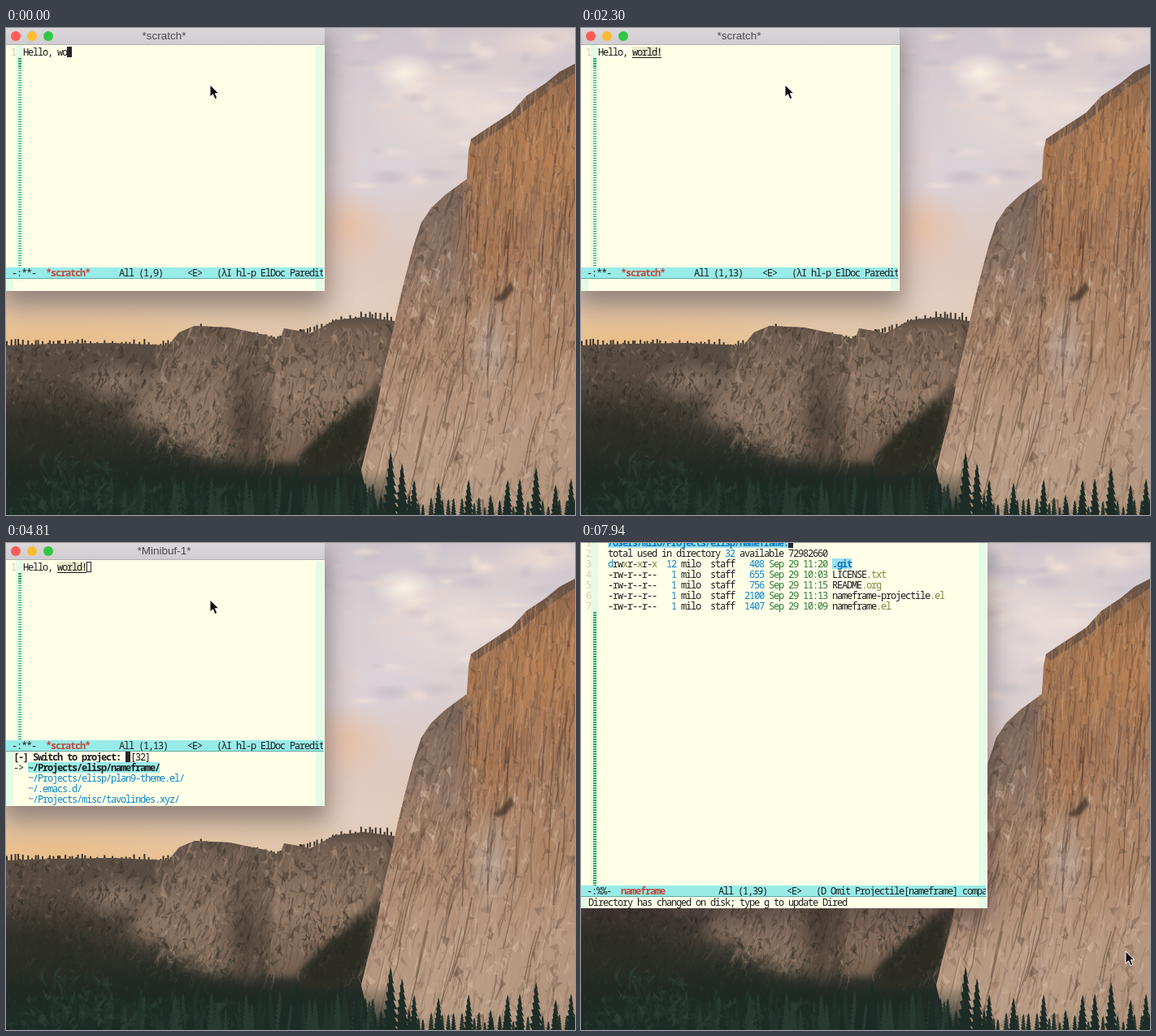
An HTML page with a canvas for the animation above (8 s loop, 700 by 600 pixels).

```html
<!DOCTYPE html>
<html lang="en">
<head>
<meta charset="utf-8">
<title>Switching projects</title>
<style>
html, body { margin: 0; width: 100%; height: 100%; overflow: hidden; }
#stage { position: relative; width: 700px; height: 600px; overflow: hidden; }
#stage * { position: absolute; box-sizing: border-box; }
canvas { left: 0; top: 0; }
.win { left: 0; overflow: hidden; background: #ffffe8; }
.shade { left: 0; top: 0; box-shadow: 0 14px 28px 4px rgba(40, 30, 35, .42); }
.bar { left: 0; top: 0; width: 100%; height: 21px; background: linear-gradient(#dbd7da, #d0ccd0); border-bottom: 1px solid #b5b0b3; }
.bar i { top: 4px; width: 12px; height: 12px; border-radius: 50%; }
.bar span { left: 0; width: 389px; top: 0; text-align: center; color: #4a474a; font: 13.5px/20px "Liberation Sans", Arial, sans-serif; }
.row, .mode { white-space: pre; color: #1c1c1c; font: 500 12px/13px "Noto Sans Mono", "DejaVu Sans Mono", monospace; font-stretch: 62.5%; letter-spacing: calc(6px - 1ch); height: 13px; }
#stage .row *, #stage .mode * { position: static; }
.mode { left: 0; padding-left: 1px; width: 100%; overflow: hidden; background: #98ece8; border-right: 2px solid #ffffe8; height: 14px; border-bottom: 1px solid #5fa9a5; }
.mode b { color: #c4473c; }
.num { color: #cdcdb6; font-weight: 400; }
.u { color: #0a86c8; } .g { color: #2c7a35; } .o { color: #82823a; }
.dir, .pick, .mark { display: inline-block; height: 13px; vertical-align: top; }
.dir { color: #0a78bc; font-weight: 700; background: #9ce0f2; }
.pick { background: #98ece8; font-weight: 700; }
.mark { background: #e8e8cc; text-decoration: underline; text-underline-offset: 2px; }
.cur { width: 6px; height: 13px; background: #262626; }
.hollow { background: none; border: 1px solid #262626; }
.fringe { width: 9px; background: #e4fbe5; }
.dash { left: 15px; width: 4px; background: repeating-linear-gradient(#33a563 0 1.5px, transparent 1.5px 3px); }
.hide { display: none; }
</style>
</head>
<body>
<div id="stage">
  <canvas id="photo" width="700" height="600"></canvas>

  <div id="edit">
    <div class="shade" style="width:392px;height:324px"></div>
    <div class="win" style="top:0;width:392px;height:324px">
      <div class="bar">
        <i style="left:6px;background:#fc5b53"></i><i style="left:26px;background:#fdbc2f"></i><i style="left:46px;background:#32c546"></i>
        <span id="title"></span>
      </div>
      <div class="fringe" style="left:12px;top:21px;height:290px"></div>
      <div class="fringe" style="left:0;top:244px;height:80px" id="low"></div>
      <div class="fringe" style="left:381px;top:23px;height:301px"></div>
      <div class="row num" style="left:6px;top:23px">1</div>
      <div class="row" style="left:21px;top:23px">Hello, <span id="word"></span></div>
      <div class="cur" id="point" style="top:23px"></div>
      <div class="dash" id="dash" style="top:37px"></div>
      <div id="mini" style="left:9px;top:257px;width:372px;height:67px;background:#ffffe8"></div>
      <div class="mode" id="mode"></div>
    </div>
  </div>

  <div id="dired">
    <div class="shade" style="width:500px;height:450px"></div>
    <div class="win" id="list" style="top:0;width:500px;height:450px">
      <div class="fringe" style="left:12px;top:0;height:422px"></div>
      <div class="fringe" style="left:489px;top:0;height:450px"></div>
      <div class="fringe" style="left:0;top:435px;height:15px"></div>
      <div class="dash" style="top:85px;height:337px"></div>
      <div class="mode" style="top:422px"> -:%%-  <b>nameframe</b>           All (1,39)    &lt;E&gt;   (D Omit Projectile[nameframe] company</div>
      <div class="row" style="left:9px;top:436px">Directory has changed on disk; type g to update Dired</div>
    </div>
  </div>

  <svg id="beam" width="12" height="20" style="left:246px;top:63px" fill="none" stroke="#222"><path d="M2 1.5Q5.5 1.5 5.5 4V15Q5.5 17.5 2 17.5M9 1.5Q5.5 1.5 5.5 4M9 17.5Q5.5 17.5 5.5 15M3.5 11.5H7.5"/></svg>
  <svg id="arrow" width="15" height="22" style="left:0;top:0"><path d="M1 1V16L4.5 12.8L7 18.6L9.9 17.4L7.4 11.7H12Z" fill="#111" stroke="#fff"/></svg>
</div>

<script>
const $ = id => document.getElementById(id);

// ---------- desktop picture ----------
const ctx = $('photo').getContext('2d');
let seed = 7;
const rnd = (a = 0, b = 1) => {
  seed = (seed * 16807) % 2147483647;
  return a + (b - a) * seed / 2147483647;
};
const pick = list => list[Math.floor(rnd(0, list.length))];

function shape(pts) {
  const p = new Path2D();
  for (let i = 0; i < pts.length; i += 2) p.lineTo(pts[i], pts[i + 1]);
  p.closePath();
  return p;
}

function fade(x0, y0, x1, y1, ...colors) {
  const g = ctx.createLinearGradient(x0, y0, x1, y1);
  colors.forEach((c, i) => g.addColorStop(i / (colors.length - 1), c));
  return g;
}

function glow(x, y, rx, ry, rgb, alpha) {
  ctx.save();
  ctx.translate(x, y);
  ctx.scale(rx, ry);
  const g = ctx.createRadialGradient(0, 0, 0, 0, 0, 1);
  g.addColorStop(0, `rgba(${rgb},${alpha})`);
  g.addColorStop(1, `rgba(${rgb},0)`);
  ctx.fillStyle = g;
  ctx.fillRect(-1, -1, 2, 2);
  ctx.restore();
}

function soft(blur, fill, pts) {
  ctx.filter = `blur(${blur}px)`;
  ctx.fillStyle = fill;
  ctx.fill(shape(pts));
  ctx.filter = 'none';
}

// Short slanted strokes that give rock its grain
function grain(n, [x0, y0, x1, y1], colors, len, lean, alpha) {
  for (let i = 0; i < n; i++) {
    const x = rnd(x0, x1), y = rnd(y0, y1), l = rnd(len * .2, len);
    ctx.globalAlpha = rnd(alpha * .3, alpha);
    ctx.strokeStyle = pick(colors);
    ctx.lineWidth = rnd(.6, 2.4);
    ctx.beginPath();
    ctx.moveTo(x, y);
    ctx.lineTo(x + lean * l * .5 + rnd(-3, 3), y + l * .5);
    ctx.lineTo(x + lean * l + rnd(-3, 3), y + l);
    ctx.stroke();
  }
  ctx.globalAlpha = 1;
}

// Small broken facets
function chips(n, [x0, y0, x1, y1], colors, size, alpha) {
  for (let i = 0; i < n; i++) {
    const x = rnd(x0, x1), y = rnd(y0, y1), r = () => rnd(-size, size);
    ctx.globalAlpha = rnd(alpha * .3, alpha);
    ctx.fillStyle = pick(colors);
    ctx.fill(shape([x + r(), y + r(), x + r(), y + r(), x + r(), y + r() * 2]));
  }
  ctx.globalAlpha = 1;
}

function inside(path, draw) {
  ctx.save();
  ctx.clip(path);
  draw();
  ctx.restore();
}

function pine(x, top, base, color) {
  const h = base - top;
  ctx.fillStyle = color;
  ctx.beginPath();
  ctx.moveTo(x, top);
  for (const side of [1, -1]) {
    for (let k = 1; k <= 9; k++) {
      const t = (side > 0 ? k : 10 - k) / 9;
      const w = h * .14 * t + 1;
      ctx.lineTo(x + side * w, top + h * t);
      ctx.lineTo(x + side * w * .5, top + h * (t - .015));
    }
  }
  ctx.fill();
}

function sky() {
  ctx.fillStyle = fade(0, 0, 0, 400, '#cdc5cc', '#d9d0d3', '#dccfd0', '#e0c8ba', '#e6c7a2');
  ctx.fillRect(0, 0, 700, 400);
  glow(60, 385, 260, 50, '236,186,124', .7);
  glow(340, 365, 120, 30, '222,198,174', .7);
  glow(418, 245, 60, 50, '234,190,158', .75);
  glow(440, 335, 90, 50, '226,208,200', .8);
  glow(470, 170, 80, 60, '218,211,219', .8);
  glow(560, 100, 120, 70, '238,224,217', .8);
  glow(490, 55, 40, 25, '255,246,230', .9);
  glow(600, 30, 90, 40, '222,208,208', .8);
  glow(660, 15, 60, 25, '240,222,212', .8);
  for (let i = 0; i < 90; i++) {
    glow(rnd(395, 700), rnd(0, 210), rnd(8, 32), rnd(4, 13), pick(['252,234,218', '190,182,192', '232,212,206']), rnd(.2, .65));
  }
}

function valley() {
  const ridge = shape([0, 391, 60, 389, 130, 388, 200, 391, 213, 375, 232, 367, 275, 369, 318, 378, 337, 384, 342, 370,
    375, 376, 405, 360, 440, 356, 478, 361, 490, 600, 0, 600]);
  ctx.fillStyle = '#3a332a';
  for (let x = 0; x < 476; x += rnd(2, 7)) {
    const y = x < 200 ? 391 : x < 240 ? 391 - (x - 200) * .6 : x < 340 ? 370 + (x - 240) * .13 : 378 - (x - 340) * .22;
    const h = rnd(1, x < 200 || x > 400 ? 8 : 4);
    ctx.fillRect(x, Math.max(y, 357) - h, 2, h + 4);
  }
  ctx.fillStyle = fade(0, 380, 0, 600, '#5a4d43', '#54483f', '#37362e', '#222d28');
  ctx.fill(ridge);
  inside(ridge, () => {
    soft(9, fade(0, 368, 0, 550, '#6d5a4d', '#8c7563', '#7d6858'),
      [200, 395, 215, 373, 240, 367, 322, 380, 326, 450, 312, 540, 235, 535, 200, 500, 150, 480, 165, 450]);
    soft(4, fade(0, 360, 0, 540, '#6c594c', '#937a67', '#715d4e'),
      [328, 395, 345, 374, 405, 364, 475, 362, 462, 430, 400, 490, 355, 535, 320, 535]);
    glow(135, 435, 55, 28, '158,134,116', .8);
    grain(500, [0, 390, 200, 530], ['#2d2c25', '#413a31', '#78665a', '#635345'], 13, -.4, .6);
    chips(500, [0, 395, 210, 500], ['#2b2a23', '#3a342c', '#84705f'], 5, .6);
    grain(600, [190, 365, 330, 540], ['#4d4036', '#a58b77', '#80695a', '#3e362f'], 24, -.35, .55);
    chips(450, [190, 370, 330, 530], ['#4a3e35', '#b0967f', '#90796a', '#352f29'], 6, .55);
    grain(400, [326, 365, 475, 530], ['#554438', '#aa8c74', '#8b715e', '#443a31'], 24, -.2, .55);
    chips(400, [326, 368, 475, 500], ['#4a3c32', '#b4967e', '#91796a', '#3a322b'], 6, .55);
    glow(295, 480, 38, 100, '45,37,31', .65);
    soft(10, fade(0, 480, 0, 560, 'rgba(34,40,33,.3)', 'rgba(31,40,34,1)'),
      [-20, 465, 90, 485, 200, 520, 350, 548, 480, 545, 480, 620, -20, 620]);
    glow(40, 490, 130, 60, '42,43,34', .8);
    soft(4, '#2c2c23', [452, 455, 430, 468, 395, 495, 368, 520, 365, 548, 400, 545, 440, 525]);
    chips(260, [365, 455, 455, 548], ['#1f251e', '#3f3b2c', '#2c3227'], 5, .6);
    chips(450, [0, 485, 350, 560], ['#1f2a23', '#37382c', '#2b342a'], 5, .5);
  });
}

function cliff() {
  const wall = shape([700, 44, 681, 54, 664, 68, 640, 84, 622, 104, 590, 125, 572, 137, 569, 152, 567, 186, 540, 206, 523, 222,
    511, 240, 501, 270, 490, 312, 482, 345, 475, 378, 464, 425, 456, 470, 444, 515, 437, 545, 450, 600, 700, 600]);
  ctx.fillStyle = fade(0, 50, 0, 600, '#93694d', '#a8774f', '#a67d61', '#ad886d', '#b69781', '#b0967f');
  ctx.fill(wall);
  inside(wall, () => {
    soft(8, fade(0, 190, 0, 420, '#77655a', '#92786a', 'rgba(165,130,105,0)'),
      [567, 180, 572, 290, 555, 420, 440, 540, 470, 340, 500, 220]);
    glow(665, 150, 70, 90, '190,132,86', .7);
    glow(600, 270, 60, 80, '172,114,72', .6);
    glow(595, 395, 30, 70, '184,168,156', .8);
    glow(665, 370, 50, 100, '176,132,102', .7);
    glow(560, 540, 90, 70, '190,162,142', .7);
    ctx.lineWidth = 13;
    ctx.strokeStyle = 'rgba(94,79,69,.75)';
    ctx.beginPath();
    for (const [x, y] of [[705, 44], [665, 71], [622, 107], [573, 140]]) ctx.lineTo(x, y);
    ctx.stroke();
    const tones = ['#5c4436', '#7c5b45', '#c79b78', '#c0855a', '#8b7466'];
    grain(800, [565, 50, 700, 300], tones, 50, -.08, .5);
    chips(350, [565, 50, 700, 300], tones, 5, .5);
    grain(450, [470, 190, 575, 420], ['#56473d', '#a58974', '#8b6d57', '#6c594d'], 40, -.3, .5);
    chips(300, [470, 190, 575, 420], ['#4e4037', '#b0937d', '#97775f'], 5, .5);
    grain(900, [435, 280, 700, 600], ['#6c5242', '#c6a891', '#b78c6b', '#8b6e5a', '#d0b5a0'], 45, -.22, .5);
    chips(900, [435, 280, 700, 600], ['#6a5345', '#d2b8a3', '#bd957a', '#8b705f'], 7, .5);
    grain(45, [560, 160, 700, 370], ['#3c2b22'], 120, -.08, .45);
    grain(35, [460, 390, 660, 520], ['#54402f'], 110, -.25, .5);
    soft(1.5, 'rgba(66,50,40,.75)', [621, 312, 625, 322, 615, 334, 606, 338, 599, 334, 610, 326]);
  });
}

function forest() {
  ctx.fillStyle = fade(0, 545, 0, 600, 'rgba(32,45,39,0)', '#1d2c27');
  ctx.fillRect(0, 545, 470, 55);
  for (let i = 0; i < 90; i++) pine(rnd(110, 460), rnd(548, 580), 605, pick(['#23322b', '#1d2b26', '#293a32']));
  chips(220, [45, 530, 128, 590], ['#2a3e33', '#1f2f28', '#31453a'], 7, .7);
  chips(350, [0, 560, 290, 600], ['#24352d', '#1c2b25', '#2e4036'], 7, .7);
  pine(358, 540, 612, '#1c2b26');
  pine(312, 552, 612, '#203029');
  for (let x = 440; x < 700; x += rnd(5, 11)) pine(x, rnd(574, 590), 610, pick(['#25352e', '#1e2c27']));
  for (const [x, top] of [[473, 522], [487, 536], [502, 556], [532, 560], [569, 556], [596, 575], [617, 556], [632, 555], [652, 541], [676, 562], [695, 555]]) {
    pine(x, top, 618, '#1d2c27');
  }
}

[sky, valley, cliff, forest].forEach(draw => draw());

// ---------- text ----------
const row = (x, y, html, cls = '') => `<div class="row ${cls}" style="left:${x}px;top:${y}px">${html}</div>`;
const tag = (cls, text) => `<span class="${cls}">${text}</span>`;

$('mini').innerHTML =
  row(0, 0, '<b>[-] Switch to project:</b>  [32]') +
  row(0, 13, '-&gt; ' + tag('pick', '~/Projects/elisp/nameframe/')) +
  ['Projects/elisp/plan9-theme.el', '.emacs.d', 'Projects/misc/tavolindes.xyz'].map((path, i) =>
    row(18, 26 + 13 * i, `~/${path}/`, 'u')).join('') +
  '<div class="cur" id="ask" style="left:138px;top:0"></div>';

const files = [
  ['drwxr-xr-x', 12, 408, '11:20', '.git', ''],
  ['-rw-r--r--', 1, 655, '10:03', 'LICENSE', '.txt'],
  ['-rw-r--r--', 1, 756, '11:15', 'README', '.org'],
  ['-rw-r--r--', 1, 2100, '11:13', 'nameframe-projectile', '.el'],
  ['-rw-r--r--', 1, 1407, '10:09', 'nameframe', '.el']
];
const lines = [
  tag('dir', '/Users/milo/Projects/elisp/nameframe:'),
  `total used in directory ${tag('u', 32)} available 72982660`,
  ...files.map(([mode, links, size, time, name, ext]) =>
    mode.replace(/[dx]/g, c => tag(c === 'd' ? 'u' : 'o', c)) +
    tag('u', String(links).padStart(4)) + ' milo  staff' +
    tag('u', String(size).padStart(6)) + ' ' + tag('g', 'Sep 29 ' + time) + ' ' +
    (ext ? name + tag('o', ext) : tag('dir', name)))
];
$('list').insertAdjacentHTML('beforeend', lines.map((html, i) =>
  row(6, 13 * i - 7, i + 1, 'num') + row(33, 13 * i - 7, html)).join('') +
  '<div class="cur" style="left:255px;top:-7px"></div>');

// ---------- timeline: each step changes part of the state ----------
const LOOP = 8000;
const steps = [
  [0, { word: 'wo', mark: false, on: true, view: 'edit', title: '*scratch*', mouse: [250, 69] }],
  [210, { word: 'worl', mark: true }],
  [420, { word: 'world', mark: false }],
  [630, { mark: true }],
  [840, { word: 'world!' }],
  [1260, { on: false }],
  [1670, { on: true }],
  [2300, { on: false }],
  [2720, { on: true }],
  [3130, { on: false }],
  [3760, { on: true, view: 'ask' }],
  [3970, { title: '*Minibuf-1*' }],
  [4390, { on: false }],
  [4810, { on: true }],
  [5440, { on: false }],
  [5860, { on: true }],
  [6270, { on: false }],
  [6900, { view: 'dired', mouse: null }],
  [7520, { mouse: [454, 308] }],
  [7730, { mouse: [510, 352] }],
  [7940, { mouse: [669, 502] }]
];

const show = (id, yes) => $(id).classList.toggle('hide', !yes);

function render(s) {
  const asking = s.view === 'ask', col = 7 + s.word.length;
  const modeTop = asking ? 243 : 295;
  show('edit', s.view !== 'dired');
  show('dired', s.view === 'dired');
  show('mini', asking);
  show('ask', s.on);
  show('point', asking || s.on);
  $('point').classList.toggle('hollow', asking);
  $('point').style.left = 21 + 6 * col + 'px';
  $('title').textContent = s.title;
  $('word').textContent = s.word;
  $('word').className = s.mark ? 'mark' : '';
  $('mode').style.top = modeTop + 'px';
  $('mode').innerHTML = ' -:**-  <b>*scratch*</b>      ' + `All (1,${col})`.padEnd(14) + '&lt;E&gt;   (λI hl-p ElDoc Paredit';
  $('dash').style.height = modeTop - 37 + 'px';
  $('low').style.top = modeTop + 'px';
  show('arrow', s.mouse);
  show('beam', !s.mouse);
  if (s.mouse) $('arrow').style.transform = `translate(${s.mouse[0]}px, ${s.mouse[1]}px)`;
}

let last = -1;
function tick() {
  const t = performance.now() % LOOP;
  const n = steps.filter(([at]) => at <= t).length;
  if (n !== last) {
    render(Object.assign({}, ...steps.slice(0, n).map(([, change]) => change)));
    last = n;
  }
  requestAnimationFrame(tick);
}
tick();
</script>
</body>
</html>
```
